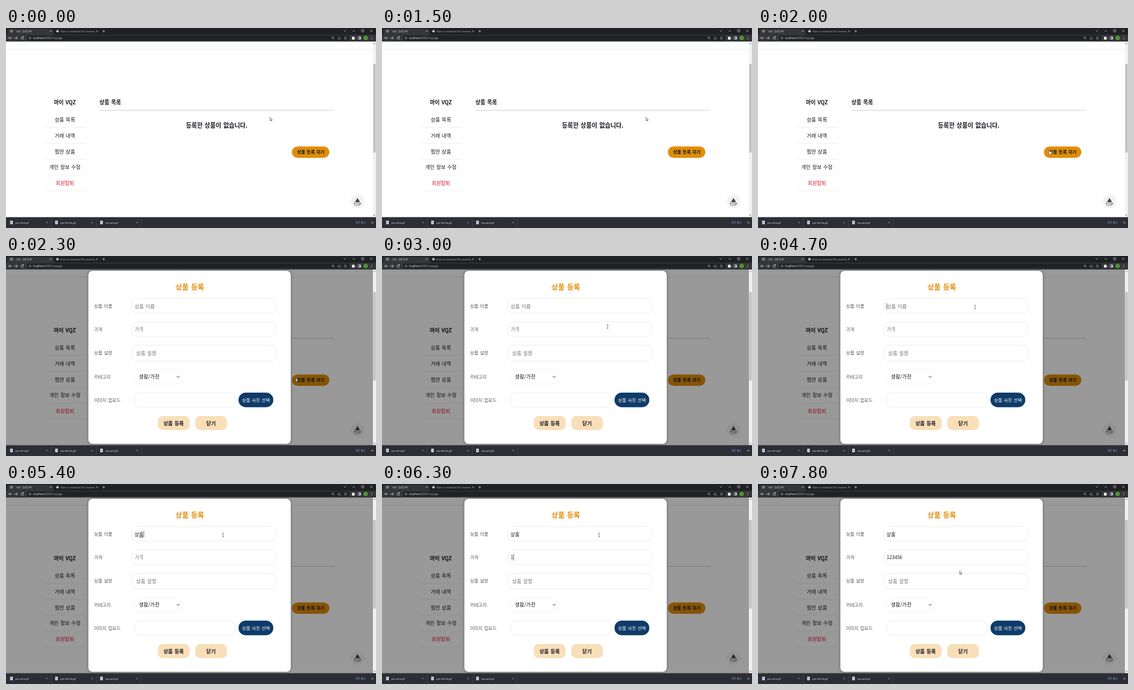
An HTML page with a canvas that plays this animation: 600 px wide and 325 px high, repeating every 8000 ms.

```html
<!DOCTYPE html>
<html lang="ko">
<head>
<meta charset="utf-8">
<title>상품 등록</title>
<style>
html, body { margin: 0; width: 100%; height: 100%; overflow: hidden; background: #fff; }
canvas { display: block; width: 600px; height: 325px; }
</style>
</head>
<body>
<canvas id="stage"></canvas>
<script>
const canvas = document.getElementById('stage');
const ctx = canvas.getContext('2d');
const ratio = window.devicePixelRatio || 1;
canvas.width = 600 * ratio;
canvas.height = 325 * ratio;

const KOREAN = '"Noto Sans CJK KR", "Noto Sans CJK", sans-serif';
const UI = '"Open Sans", "Noto Sans CJK KR", sans-serif';
const LOOP = 8000, STEP = 100;
const INK = '#17171f', LABEL = '#555', ORANGE = '#e08e0b', LIGHT = '#e8eaed';

// y is the vertical centre of the glyphs
function text(str, x, y, size, color, { bold = false, align = 'left', font = KOREAN } = {}) {
  ctx.font = `${bold ? 700 : 400} ${size}px ${font}`;
  ctx.wordSpacing = font === KOREAN ? size * 0.11 + 'px' : '0px';
  ctx.textAlign = align;
  ctx.fillStyle = color;
  ctx.fillText(str, x, y + size * 0.37);
}

function rect(x, y, w, h, color) {
  ctx.fillStyle = color;
  ctx.fillRect(x, y, w, h);
}

function box(x, y, w, h, r, fill, stroke) {
  ctx.beginPath();
  ctx.roundRect(x, y, w, h, r);
  if (fill) { ctx.fillStyle = fill; ctx.fill(); }
  if (stroke) { ctx.strokeStyle = stroke; ctx.lineWidth = 0.7; ctx.stroke(); }
}

function disc(x, y, r, fill) {
  ctx.beginPath();
  ctx.arc(x, y, r, 0, 7);
  ctx.fillStyle = fill;
  ctx.fill();
}

function stroke(path, color, width = 0.6) {
  ctx.strokeStyle = color;
  ctx.lineWidth = width;
  ctx.stroke(new Path2D(path));
}

function fill(path, color) {
  ctx.fillStyle = color;
  ctx.fill(new Path2D(path));
}

const cross = (x, y, r, color) => stroke(`M${x - r} ${y - r}l${2 * r} ${2 * r}m0 ${-2 * r}l${-2 * r} ${2 * r}`, color);
const ring = (x, y, r, color) => stroke(`M${x - r} ${y}a${r} ${r} 0 1 0 ${2 * r} 0a${r} ${r} 0 1 0 ${-2 * r} 0`, color);

function drawBrowser() {
  rect(0, 0, 600, 11, '#202124');
  box(2, 1.5, 75, 12, [2.5, 2.5, 0, 0], '#35363a');
  rect(0, 11, 600, 11, '#35363a');

  ring(9, 5.2, 2, '#cfd1d4');
  stroke('M7 5.2h4M9 3.2v4', '#cfd1d4', 0.4);
  text('VQZ - 상품 등록', 16.5, 5.2, 3.75, LIGHT, { font: UI });
  cross(72.5, 5.2, 1.1, LIGHT);
  disc(83.5, 5.2, 2, '#c8cacd');
  ctx.save();
  ctx.beginPath();
  ctx.rect(88, 0, 56, 11);
  ctx.clip();
  text('Video to animated GIF converter', 88, 5.2, 3.75, '#bdc1c6', { font: UI });
  ctx.restore();
  cross(147.5, 5.2, 1.1, LIGHT);
  stroke('M156.5 5.2h4M158.5 3.2v4', LIGHT);
  stroke('M547.7 3.6l1.8 1.8 1.8-1.8M562 4.7h4M576.7 2.8h3.4v3.4h-3.4z', LIGHT);
  cross(592.5, 4.5, 1.6, LIGHT);

  stroke('M9.5 16.2h-5m2.2-2.2l-2.2 2.2 2.2 2.2M13.5 16.2h5m-2.2-2.2l2.2 2.2-2.2 2.2', LIGHT, 0.7);
  stroke('M28.4 15a2 2 0 1 0 .2 2M28.6 13.7v1.6h-1.6', LIGHT, 0.7);
  box(34, 12.2, 523, 8, 4, '#202124');
  ring(39, 16.2, 1.5, '#bdc1c6');
  stroke('M39 15.3v1.8', '#bdc1c6', 0.4);
  text('localhost', 44, 16.2, 4.4, LIGHT, { font: UI });
  const hostWidth = ctx.measureText('localhost').width;
  text(':8080/mypage', 44 + hostWidth, 16.2, 4.4, '#9aa0a6', { font: UI });

  ring(530, 15.8, 1.3, '#bdc1c6');
  stroke('M531 16.8l1.3 1.3M540 15.5h-1.4v2.6h4v-1.2M540 16.7q.3-2 2.8-2', '#bdc1c6', 0.5);
  stroke('M550.5 13.9l.7 1.5 1.6.2-1.2 1.1.3 1.6-1.4-.8-1.4.8.3-1.6-1.2-1.1 1.6-.2z', '#bdc1c6', 0.5);
  fill('M561 14.5h1.2a.8 .8 0 0 1 1.6 0h1.4v1.3a.8 .8 0 0 1 0 1.6v1.3h-4.2z', LIGHT);
  stroke('M571 14.2h4v4h-4z', LIGHT);
  rect(573.2, 14.2, 1.8, 4, LIGHT);
  disc(583.3, 16.2, 3.4, '#4d9a2c');
  for (const y of [14.4, 16.2, 18]) disc(593, y, 0.5, LIGHT);
}

function drawDownloads() {
  rect(0, 307.5, 600, 17.5, '#2d2e35');
  ['vqz-item.gif', 'vqz-fixinfo.gif', 'vqz-pick.gif'].forEach((name, i) => {
    const x = i * 73;
    box(x + 6.8, 313.2, 4.2, 5.6, 0.6, '#f1f3f4');
    rect(x + 7.8, 315.2, 2.2, 2, '#4f83d1');
    text(name, x + 15, 316.2, 4.06, LIGHT, { font: UI });
    stroke(`M${x + 65} 317l1.6-1.6 1.6 1.6`, LIGHT);
    rect(x + 73, 310, 0.5, 13, '#55575d');
  });
  text('모두 표시', 567, 316.2, 4.06, '#8ab4f8', { font: UI });
  cross(594, 316.2, 1.5, LIGHT);
}

function drawPage() {
  rect(0, 22, 595, 285.5, '#fff');
  rect(0, 34, 595, 0.7, '#e6e6e6');

  text('마이 VQZ', 95.5, 121, 8.6, INK, { bold: true, align: 'center' });
  ['상품 목록', '거래 내역', '찜한 상품', '개인 정보 수정', '회원탈퇴'].forEach((item, i) => {
    const y = 149 + i * 25.8;
    text(item, 95.5, y, 8.2, i === 4 ? '#e5102b' : INK, { align: 'center' });
    rect(63, y + 12.3, 65, 0.6, '#e6e6e6');
  });

  text('상품 목록', 151.5, 120.3, 8.7, INK, { bold: true });
  rect(152, 133.4, 380, 0.9, '#c9c9c9');
  text('등록한 상품이 없습니다.', 341.7, 158, 9.8, INK, { bold: true, align: 'center' });

  box(463.5, 192.5, 61, 18.5, 9.25, ORANGE);
  text('상품 등록 하기', 494.2, 201.8, 7.2, INK, { bold: true, align: 'center' });

  disc(570, 282.3, 11, '#f2f2f2');
  fill('M570 276.2l4.2 6.8h-8.4z', '#444');
  text('TOP', 570, 286.7, 6.3, '#333', { align: 'center', font: UI });
}

function drawScrollbar() {
  rect(595, 22, 5, 285.5, '#f1f1f1');
  rect(595.5, 58.5, 4, 144, '#c1c1c1');
  fill('M597.5 24l1.4 1.8h-2.8z', '#777');
  fill('M597.5 305.4l1.4-1.8h-2.8z', '#777');
}

const inputs = [[204, 69, 234, 24], [204, 107, 234, 24], [204, 145, 234, 25.5]];

function drawModal(t) {
  rect(0, 22, 595, 285.5, 'rgba(0,0,0,.4)');
  ctx.save();
  ctx.shadowColor = 'rgba(0,0,0,.4)';
  ctx.shadowBlur = 4 * ratio;
  box(133.5, 24, 328.3, 281.3, 7, '#fff');
  ctx.restore();

  text('상품 등록', 298, 51, 11.6, ORANGE, { bold: true, align: 'center' });
  ['상품 이름', '가격', '상품 설명', '카테고리', '이미지 업로드'].forEach((label, i) =>
    text(label, 142.7, [81.7, 119.3, 157.5, 196.3, 234][i], 7.4, LABEL));

  for (const [x, y, w, h] of inputs) box(x, y, w, h, 9, '#fff', '#e4e4e4');
  box(208.5, 184.5, 75, 23.5, 8, '#fff', '#efefef');
  box(208.5, 222, 163.5, 24, 11, '#fff', '#e4e4e4');
  text('생활/가전', 215.5, 196.3, 8.2, INK);
  stroke('M277.2 195.4l2 2 2-2', '#222', 1);

  box(377, 222, 56.5, 23.7, 11.8, '#0f3b69');
  text('상품 사진 선택', 405.3, 234, 7.3, '#fff', { align: 'center' });
  box(246, 260, 52, 23, 8.5, '#f9dfb9');
  text('상품 등록', 271.8, 271.6, 8.3, INK, { bold: true, align: 'center' });
  box(306.8, 260, 51.5, 23, 8.5, '#f9dfb9');
  text('닫기', 332.5, 271.6, 8.3, INK, { bold: true, align: 'center' });

  drawFields(t);
}

// [time, name typed so far]
const nameTyping = [[0, ''], [4800, 'ㅅ'], [4900, '사'], [5000, '상'], [5200, '상ㅍ'], [5300, '상푸'], [5400, '상품'], [5600, '상품 ']];
const digitTimes = [6300, 6500, 6700, 6800, 7000, 7300];
const caretOn = [[3600, 4100], [4700, 7800]];

function drawFields(t) {
  const name = nameTyping.filter(([at]) => t >= at).pop()[1];
  const price = '123456'.slice(0, digitTimes.filter(at => t >= at).length);
  const onPrice = t >= 6000;

  const field = (value, hint, x, y, size) => text(value || hint, x, y, size, value ? INK : '#757575');
  field('', '상품 설명', 211, 157.6, 8.2);
  field(name, '상품 이름', 208.5, 81.7, value0(name));
  if (t >= 4800 && t < 5600) {
    const end = 208.5 + ctx.measureText(name).width;
    rect(end - 7, 86, 6.6, 0.5, INK);
  }
  const nameEnd = name ? 208.5 + ctx.measureText(name).width : 208.5;
  field(price, '가격', 208.8, 119.2, 7.6);
  const priceEnd = price ? 208.8 + ctx.measureText(price).width : 208.8;

  if (caretOn.some(([from, to]) => t >= from && t < to))
    rect(onPrice ? priceEnd : nameEnd, onPrice ? 114 : 76.3, 0.6, 10.3, '#222');
}

function value0(value) {
  return value ? 7.9 : 8.2;
}

// [time, x, y]
const pointerPath = [
  [0, 428, 145], [1800, 428, 145], [2000, 472, 198], [2200, 472, 198], [2300, 470, 198.5],
  [3100, 351, 102.5], [3300, 351, 102.5], [3500, 352, 83], [7500, 352, 83], [7800, 327, 141], [LOOP, 327, 141]
];

function pointerAt(t) {
  const next = pointerPath.findIndex(([at]) => at > t);
  const [t0, x0, y0] = pointerPath[next - 1], [t1, x1, y1] = pointerPath[next];
  const p = (t - t0) / (t1 - t0);
  return [x0 + (x1 - x0) * p, y0 + (y1 - y0) * p];
}

function drawPointer(t) {
  const [x, y] = pointerAt(t);
  const overInput = t >= 2300 && inputs.some(([l, top, w, h]) => x > l && x < l + w && y > top && y < top + h);
  const shape = path => { fill(path, '#fff'); stroke(path, '#222', 0.55); };
  ctx.save();
  ctx.translate(x, y);
  if (overInput) stroke('M-1.3-3h2.6M0-3v6M-1.3 3h2.6', '#444', 0.6);
  else if (t >= 2000 && t < 2300)
    shape('M0 .6a.7 .7 0 0 1 1.4 0v2l2.4.7q.8.3.6 1.2l-.5 2.7h-3.2l-2.2-2.6q0-.9 1.5-.2z');
  else shape('M0 0v5.6l1.3-1.2 1 2 .9-.4-.9-2h1.7z');
  ctx.restore();
}

function draw(now) {
  const t = Math.floor((now % LOOP) / STEP) * STEP;
  ctx.setTransform(ratio, 0, 0, ratio, 0, 0);
  drawPage();
  if (t >= 2300) drawModal(t);
  drawScrollbar();
  drawBrowser();
  drawDownloads();
  drawPointer(t);
}

const start = performance.now();
function tick() {
  draw(performance.now() - start);
  requestAnimationFrame(tick);
}
tick();
</script>
</body>
</html>
```
